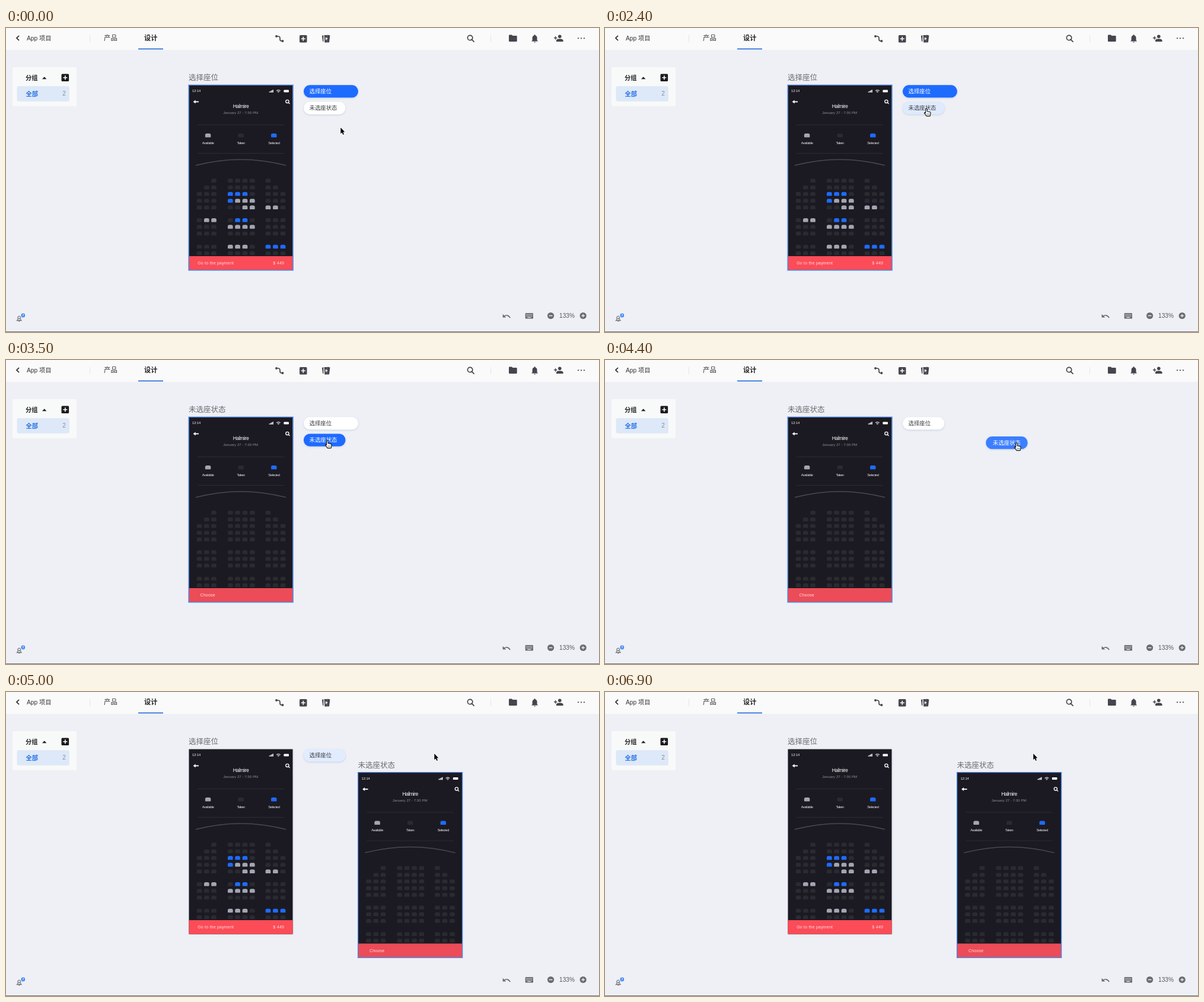
An HTML page with a canvas for the animation above (7900 ms loop, 1000x513 px).

```html
<!DOCTYPE html>
<html lang="zh-CN">
<head>
<meta charset="utf-8">
<title>Seat design board</title>
<style>
  html, body { margin: 0; width: 100%; height: 100%; overflow: hidden; background: #eef0f5; }
  canvas { display: block; }
</style>
</head>
<body>
<canvas id="stage" width="1000" height="513"></canvas>
<script>
const ctx = document.getElementById('stage').getContext('2d');
const LOOP = 7900, STEP = 100;
const BG = '#eef0f5', BLUE = '#1e6bff', INK = '#45464d', GREY = '#6b6c73';
const HOVER = 1800, SELECT = 2600, DRAG = 4100, DROP = 5000;

// Seat plan: s selected, a available, . taken
const SEATS = [
  '  ......  ', ' ........ ', '...sss....', '...saaa...', '.....aaaa.',
  '.aa.ss....', '...aaaa...', '..........', '...aaa.sss', '..........'
];
SEATS[0] = '  ......' + '  ';
const SEAT_X = [326, 338.3, 350.5, 378.3, 390.6, 403, 415.3, 442, 454.4, 467];
const SEAT_Y = [257.5, 269, 280, 291.5, 302.7, 324.4, 335.5, 346.7, 369, 380];
const SEAT_COLOR = { s: BLUE, a: '#a3a6b0', '.': '#2a2a31' };

// Pointer keys: time, x, y
const POINTER = [
  [1500, 564, 168], [1600, 561, 165.5], [1700, 552, 157], [1800, 545, 147], [2000, 541.5, 135.5],
  [4000, 541.5, 135.5], [4100, 548, 136], [4200, 577, 137], [4300, 632, 139], [4400, 693.5, 139.5],
  [4500, 725, 133], [4600, 733, 122], [4800, 722, 104]
];

const clamp = v => Math.max(0, Math.min(1, v));

function rect(x, y, w, h, color, r = 0) {
  ctx.fillStyle = color;
  ctx.beginPath();
  ctx.roundRect(x, y, w, h, r);
  ctx.fill();
}

function circle(x, y, r, color) {
  ctx.fillStyle = color;
  ctx.beginPath();
  ctx.arc(x, y, r, 0, 7);
  ctx.fill();
}

function fill(d, color) {
  ctx.fillStyle = color;
  ctx.fill(new Path2D(d));
}

function stroke(d, color, width) {
  ctx.strokeStyle = color;
  ctx.lineWidth = width;
  ctx.stroke(new Path2D(d));
}

function text(s, x, y, size, color, { weight = 400, align = 'left', gap = 0 } = {}) {
  ctx.font = `${weight} ${size}px "Liberation Sans", "Noto Sans CJK SC", "Noto Sans CJK", sans-serif`;
  ctx.letterSpacing = gap + 'px';
  ctx.textAlign = align;
  ctx.fillStyle = color;
  ctx.fillText(s, x, y);
}

function plusBox(x, y, size, color) {
  const c = size / 2;
  rect(x, y, size, size, color, 1.5);
  stroke(`M${x + c - 3.5} ${y + c}h7M${x + c} ${y + c - 3.5}v7`, '#fff', 1.6);
}

function drawHeader() {
  rect(0, 0, 1000, 37, '#fafafa');
  stroke('M22 13l-4 4 4 4', '#222', 1.7);
  text('App 项目', 35, 20.5, 10.2, '#333');
  rect(141, 12, 1, 12, '#e6e6e8');
  text('产品', 165, 21, 11.4, '#333');
  text('设计', 233, 21, 11.2, '#222', { weight: 700 });
  rect(223, 34.5, 42, 1.7, '#2a6fdc');

  stroke('M456 14h3q3 0 3 3v2q0 3 3 3h2', INK, 1.7);
  circle(456, 14, 1.9, INK);
  circle(466.5, 22, 1.9, INK);
  plusBox(495, 12, 12.5, INK);
  fill('M532.8 13l2.6-.8v11l-1.2-.4zM536.6 12h5.2v12.5h-4.4zM542 11.4l4.4 1-1.4 11.8-3 .3z', INK);
  fill('M538.8 15.4l4 2.6-4 2.6z', '#fafafa');

  stroke('M786.8 16.5a4.2 4.2 0 1 1-8.4 0a4.2 4.2 0 1 1 8.4 0M785.6 19.6l4 4', INK, 1.7);
  rect(817, 12, 1, 12, '#e6e6e8');
  fill('M849 11.5h4l1.5 1.6h6q1.2 0 1.2 1.2v7.5q0 1.2-1.2 1.2h-11.3q-1.2 0-1.2-1.2v-9.1q0-1.2 1-1.2z', INK);
  fill('M886 22.5l1.6-1.8v-4q0-3.5 3-4.3v-.6q1-1.4 2 0v.6q3 .8 3 4.3v4l1.6 1.8zM890 23.4h3.2q-1.6 2.8-3.2 0z', INK);
  circle(933.8, 14.2, 2.8, INK);
  fill('M928 23v-1.7q0-3 5.8-3t5.8 3V23z', INK);
  stroke('M924 16.8h5.4M926.7 14.1v5.4', INK, 1.4);
  for (const x of [965, 970, 975]) circle(x, 17.3, 1.1, INK);
}

function drawPanel() {
  rect(11, 66, 108, 66, '#f8f9f9', 2);
  text('分组', 33, 87.8, 10.2, '#222', { weight: 700 });
  fill('M61 86.2h7.4l-3.7-4z', '#222');
  plusBox(93.5, 77.5, 12.6, '#1b1b1f');
  rect(18.5, 98.3, 88.3, 25.5, '#dde8f8', 3);
  text('全部', 33.5, 114.5, 10.2, '#2470e6', { weight: 700 });
  text('2', 95.3, 114.3, 10, '#888c94');
}

function drawFooter() {
  stroke('M18.4 493.6l1.4-1.5v-2.8q0-3 2.4-3t2.4 3v2.8l1.4 1.5z', GREY, 1.1);
  circle(22.2, 490.5, 1.2, GREY);
  rect(21, 494, 2.5, 1.2, GREY);
  circle(28.8, 485, 3.4, '#4a8df0');
  text('?', 28.8, 487, 5, '#fff', { weight: 700, align: 'center' });

  stroke('M839 487.2q6-5.6 11.3 1.8', GREY, 1.6);
  fill('M837.6 482.8v5.8h5.8z', GREY);
  rect(875.7, 481, 13.3, 9.6, GREY, 1.2);
  for (let i = 0; i < 5; i++) {
    rect(877.3 + i * 2.2, 482.8, 1.2, 1.2, BG);
    rect(877.3 + i * 2.2, 485.2, 1.2, 1.2, BG);
  }
  rect(879.3, 487.8, 6, 1.2, BG);
  circle(918.6, 485.5, 5.6, GREY);
  circle(973.2, 485.5, 5.6, GREY);
  stroke('M915.8 485.5h5.6M970.4 485.5h5.6M973.2 482.7v5.6', BG, 1.3);
  text('133%', 933, 489, 10.2, '#55565c');
  rect(0, 512, 1000, 1, '#707277');
}

function drawSeat(cx, cy, w, color) {
  rect(cx - w / 2, cy - 3.3, w, 6.5, color, [2.6, 2.6, 1, 1]);
}

function drawBoard(dx, dy, booked, selected) {
  ctx.save();
  ctx.translate(dx, dy);
  text(booked ? '选择座位' : '未选座状态', 308, 88, 12.5, '#6a6b70');
  if (!selected) {
    ctx.shadowColor = 'rgba(40,50,80,.2)';
    ctx.shadowBlur = 3;
  }
  rect(308.5, 96.5, 175, 312, '#1b1a22');
  ctx.shadowColor = 'transparent';

  text('12:14', 314, 108.4, 5.7, '#fff');
  for (let i = 0; i < 4; i++) rect(443.8 + i * 1.9, 107.3 - i, 1.4, 1.5 + i, '#fff');
  stroke('M456 105.8q3.4-2.8 6.8 0M457.5 107.3q1.9-1.5 3.8 0', '#fff', 1);
  circle(459.4, 108.4, .7, '#fff');
  rect(468.4, 104.6, 8.6, 4, '#fff', 1);
  stroke('M317 124.5h8', '#fff', 1.8);
  fill('M315.6 124.5l4-3v6z', '#fff');
  stroke('M477 123.9a2.6 2.6 0 1 1-5.2 0a2.6 2.6 0 1 1 5.2 0M476.2 125.7l2.4 2.4', '#fff', 1.3);

  const mid = { align: 'center' };
  text('Halmire', 396, 135.4, 8.7, '#fff', { ...mid, gap: -.5 });
  text('January 27 - 7:30 PM', 395.7, 145.2, 6.17, '#8e8e95', mid);
  rect(323, 163, 146, 1, '#2b2b32');
  rect(323, 211, 146, 1, '#2b2b32');
  [['Available', 'a'], ['Taken', '.'], ['Selected', 's']].forEach(([label, kind], i) => {
    const x = 340.6 + i * 55.6;
    drawSeat(x, 181.4, 9.5, SEAT_COLOR[kind]);
    text(label, x, 195.6, 5.7, '#f2f2f4', { ...mid, gap: -.35 });
  });
  stroke('M320 231.8Q396 212 472 231.8', '#484850', 1.5);

  SEATS.forEach((row, r) => [...row].forEach((kind, c) => {
    if (kind !== ' ') drawSeat(SEAT_X[c], SEAT_Y[r], 8.7, SEAT_COLOR[booked ? kind : '.']);
  }));

  rect(308.5, 385, 175, 23.5, booked ? '#fb4c58' : '#ec4c57');
  if (booked) {
    text('Go to the payment', 323.2, 399.3, 7, '#ffe0e2', { gap: .2 });
    text('$ 449', 450.3, 399.3, 7, '#ffe0e2', { gap: .3 });
  } else {
    text('Choose', 327.5, 399.3, 7, '#ffe0e2', { gap: .2 });
  }
  if (selected) stroke('M308.1 96.1h176v312.6h-176z', '#4b87ea', 1.4);
  ctx.restore();
}

// tint: 0 white, 1 solid blue
function drawPill(x, y, w, label, tint, inset, alpha = 1) {
  ctx.save();
  ctx.globalAlpha = alpha;
  ctx.shadowColor = 'rgba(60,90,150,.22)';
  ctx.shadowBlur = 3;
  ctx.shadowOffsetY = 1;
  rect(x, y, w, 21.3, '#fff', 10.6);
  ctx.shadowColor = 'transparent';
  ctx.globalAlpha = alpha * tint;
  rect(x, y, w, 21.3, BLUE, 10.6);
  ctx.globalAlpha = alpha;
  text(label, x + inset, y + 13.7, 9.4, tint > .5 ? '#fff' : '#3c3d42');
  ctx.restore();
}

function pointerAt(t) {
  const i = POINTER.findIndex(key => key[0] > t);
  if (i === 0) return POINTER[0].slice(1);
  if (i < 0) return POINTER.at(-1).slice(1);
  const [t0, x0, y0] = POINTER[i - 1], [t1, x1, y1] = POINTER[i];
  const p = (t - t0) / (t1 - t0);
  return [x0 + (x1 - x0) * p, y0 + (y1 - y0) * p];
}

function drawPointer(x, y, hand) {
  ctx.save();
  ctx.translate(x, y);
  ctx.lineJoin = 'round';
  if (hand) {
    const d = 'M-.9 1.2q1.2-1.9 2.5 0v4l4.4.8q1.8.5 1.6 2.5l-.9 4.6H.7l-3.6-4.8q-.3-1.6 1.1-1.2l.9 1z';
    fill(d, '#fff');
    stroke(d, '#111', 1.1);
    stroke('M1.6 8.8v2.2M3.4 8.8v2.2M5.1 8.8v2.2', '#111', .6);
  } else {
    const d = 'M.3 0v10.4l2.3-2.2 1.7 3.9 1.7-.8-1.7-3.7h3.1z';
    stroke(d, '#fff', 1.8);
    fill(d, '#000');
  }
  ctx.restore();
}

function draw(t) {
  const [x, y] = pointerAt(t);
  const over = t >= HOVER && t < DROP;
  const picked = 1 - (1 - clamp((t - SELECT) / 200)) ** 3;

  rect(0, 0, 1000, 513, BG);
  drawHeader();
  drawPanel();
  drawFooter();

  if (t < DROP) {
    drawBoard(0, 0, t <= SELECT, true);
  } else {
    drawBoard(0, 0, true, false);
    drawBoard(285.5, 39.5, false, true);
  }

  const firstTint = t < DROP ? 1 - picked : .13;
  drawPill(502, 96.3, t < DRAG ? 92 : 70.5, '选择座位', firstTint, 9.5, clamp((DROP + 200 - t) / 200));
  if (t < DRAG) {
    const hover = over ? .14 : 0;
    drawPill(502, 124.5, 70.5, '未选座状态', hover + (1 - hover) * picked, 9.5);
  } else if (t < DROP) {
    drawPill(x - 51.2, y - 10.5, 70.5, '未选座状态', .87, 11.7);
  }
  drawPointer(x, y, over);
}

function tick() {
  draw(Math.floor(performance.now() % LOOP / STEP) * STEP);
  requestAnimationFrame(tick);
}
tick();
</script>
</body>
</html>
```
